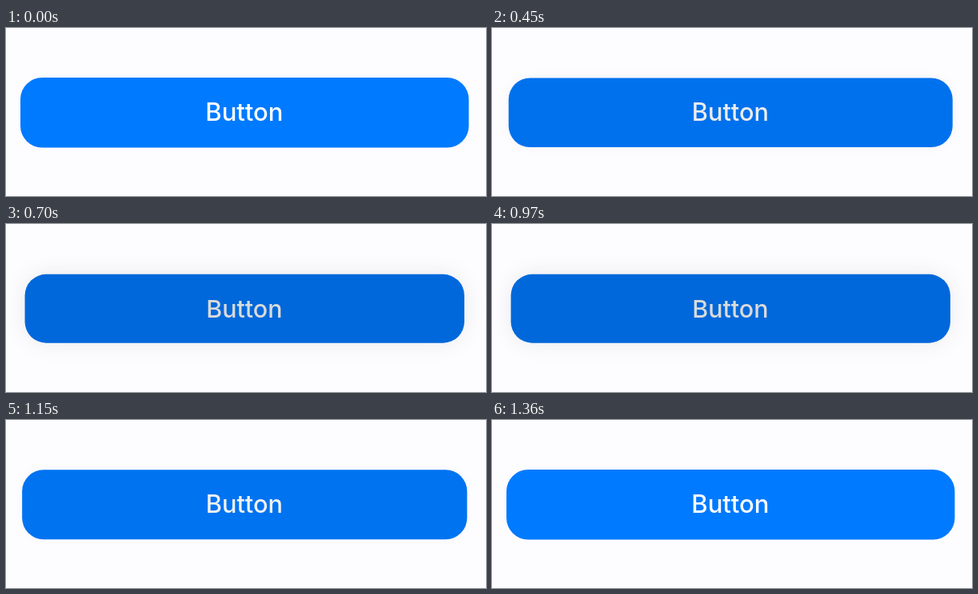
An HTML page with a canvas for the animation above (1.39 s loop, 600x210 px).

```html
<!DOCTYPE html>
<html lang="en">
<head>
<meta charset="utf-8">
<title>Button press</title>
<style>
  html, body { margin: 0; width: 100%; height: 100%; overflow: hidden; background: #fdfcff; }
  canvas { display: block; width: 600px; height: 210px; }
</style>
</head>
<body>
<canvas id="stage"></canvas>
<script>
const W = 600, H = 210, LOOP = 1390, STEP = 30;
const PRESS = 375, RELEASE = 1045, RATE = 0.022;
const BOX = { x: 18, y: 62, w: 560.5, h: 87.5, r: 27 };
const CX = BOX.x + BOX.w / 2, CY = BOX.y + BOX.h / 2;

const canvas = document.getElementById('stage');
const ctx = canvas.getContext('2d');
const dpr = window.devicePixelRatio || 1;
canvas.width = W * dpr;
canvas.height = H * dpr;

// Critically damped spring from 0 to 1
function spring(ms) {
  const k = Math.max(0, ms) * RATE;
  return 1 - (1 + k) * Math.exp(-k);
}

function shade(r, g, b, f) {
  return `rgb(${Math.round(r * f)}, ${Math.round(g * f)}, ${Math.round(b * f)})`;
}

function draw(t) {
  const p = spring(t - PRESS) - spring(t - RELEASE);
  const scale = 1 - 0.02 * p;
  const light = 1 - 0.145 * p;

  ctx.setTransform(dpr, 0, 0, dpr, 0, 0);
  ctx.fillStyle = '#fdfcff';
  ctx.fillRect(0, 0, W, H);

  ctx.translate(CX, CY);
  ctx.scale(scale, scale);
  ctx.translate(-CX, -CY);

  ctx.save();
  ctx.shadowColor = `rgba(0, 0, 0, ${0.08 * p})`;
  ctx.shadowBlur = 30 * p * dpr;
  ctx.fillStyle = shade(0, 122, 255, light);
  ctx.beginPath();
  ctx.roundRect(BOX.x, BOX.y, BOX.w, BOX.h, BOX.r);
  ctx.fill();
  ctx.restore();

  ctx.font = '500 31px Inter, "Liberation Sans", sans-serif';
  ctx.textAlign = 'center';
  ctx.textBaseline = 'alphabetic';
  ctx.fillStyle = shade(255, 255, 255, light);
  ctx.fillText('Button', CX - 0.4, 116 + 0.8 * p);
}

function tick() {
  const t = performance.now() % LOOP;
  draw(Math.floor(t / STEP) * STEP);
  requestAnimationFrame(tick);
}
tick();
</script>
</body>
</html>
```
